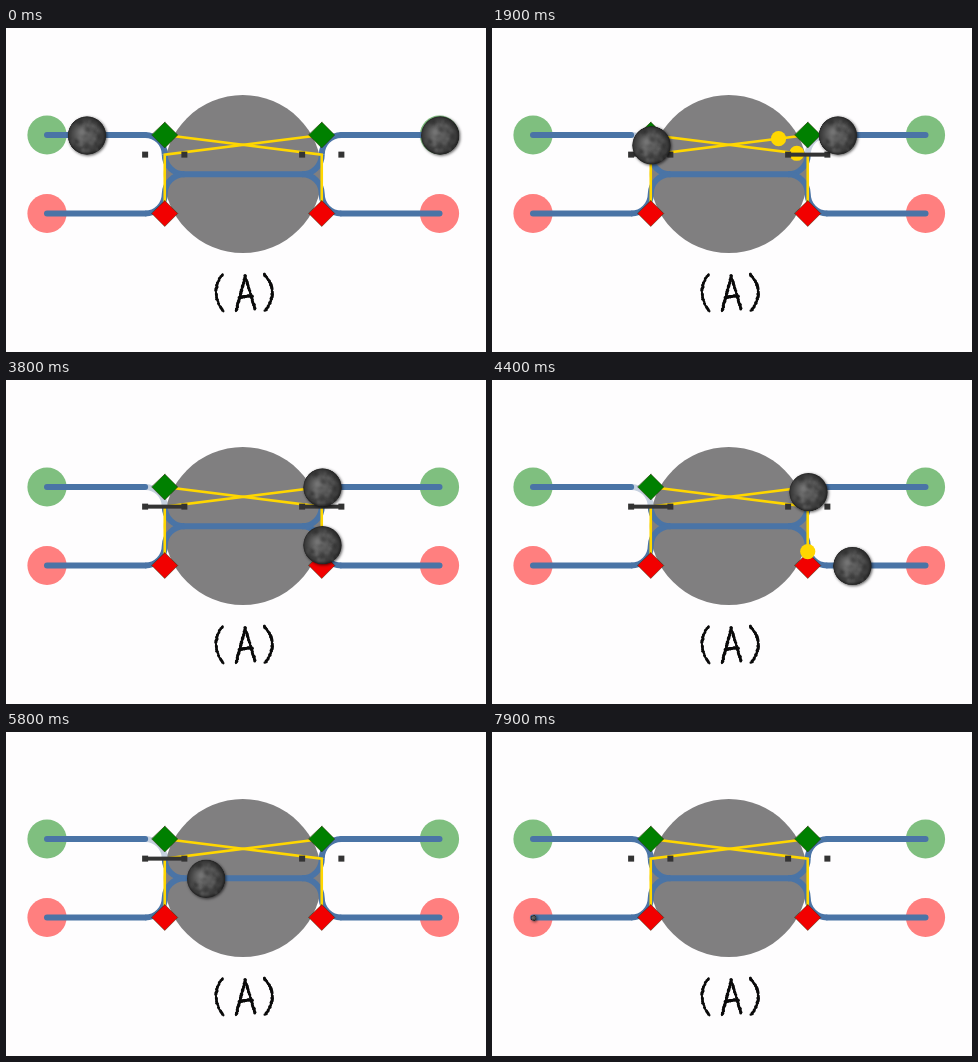
Animation of 480 by 324 pixels, one loop 8000 ms. Source, as an HTML page with a canvas:

```html
<!DOCTYPE html>
<html lang="en">
<head>
<meta charset="utf-8">
<title>Track junction</title>
<style>
  html, body { margin: 0; width: 100%; height: 100%; overflow: hidden; background: #fefdfe; }
  canvas { display: block; }
</style>
</head>
<body>
<canvas id="stage" width="480" height="324" role="img" aria-label="(A)"></canvas>
<script>
const ctx = document.getElementById('stage').getContext('2d');
const LOOP = 8000, STEP = 100;
const START = 1081, TICK = 364;      // balls cross one grid cell per tick
const CELL = 39.25, BALL_R = 19.6;
const BLUE = '#4a74a6', PALE = '#c5d0df', GOLD = '#ffd700', DARK = '#333333';

const X = g => 41 + g * CELL;
const Y = g => 107 + g * CELL;

const ROUTES = [
  { path: [[1, 0], [3, 0], [3, 1], [7, 1], [7, 2], [10, 2]], travel: k => k },
  { path: [[10, 0], [7, 0], [7, 1], [3, 1], [3, 2], [0, 2]], travel: k => k < 9 ? Math.min(k, 3) : k - 6 }
];
const GATES = [{ x: 3, shut: 2, open: 16 }, { x: 7, shut: 1, open: 9 }];
const SIGNALS = [
  { at: 1, from: [3, 0], to: [7, 0.5] },
  { at: 2, from: [7, 0], to: [3, 0.5] },
  { at: 9, from: [7, 2], to: [7, 0.5] },
  { at: 16, from: [3, 2], to: [3, 0.5] }
];

function random(seed) {
  return () => (seed = (seed * 16807) % 2147483647) / 2147483647;
}

function disc(x, y, r, fill, c = ctx) {
  c.fillStyle = fill;
  c.beginPath();
  c.arc(x, y, r, 0, Math.PI * 2);
  c.fill();
}

function line(points, color, width) {
  ctx.strokeStyle = color;
  ctx.lineWidth = width;
  ctx.beginPath();
  points.forEach(([x, y]) => ctx.lineTo(X(x), Y(y)));
  ctx.stroke();
}

function bend(a, corner, b, color) {
  ctx.strokeStyle = color;
  ctx.lineWidth = 6;
  ctx.beginPath();
  ctx.moveTo(X(a[0]), Y(a[1]));
  ctx.arcTo(X(corner[0]), Y(corner[1]), X(b[0]), Y(b[1]), CELL / 2);
  ctx.stroke();
}

function diamond(x, y, fill) {
  ctx.fillStyle = fill;
  ctx.strokeStyle = 'rgba(40,40,0,.6)';
  ctx.lineWidth = 0.8;
  ctx.beginPath();
  for (const [dx, dy] of [[0, -13], [13, 0], [0, 13], [-13, 0]]) ctx.lineTo(X(x) + dx, Y(y) + dy);
  ctx.closePath();
  ctx.fill();
  ctx.stroke();
}

// Mottled dark sphere, painted once at double size
const ball = document.createElement('canvas');
ball.width = ball.height = 80;
{
  const b = ball.getContext('2d'), rnd = random(41);
  b.beginPath();
  b.arc(40, 40, 39, 0, Math.PI * 2);
  b.clip();
  const base = b.createRadialGradient(30, 33, 3, 40, 40, 40);
  base.addColorStop(0, '#747474');
  base.addColorStop(0.5, '#515151');
  base.addColorStop(0.85, '#393939');
  base.addColorStop(1, '#1c1c1c');
  b.fillStyle = base;
  b.fillRect(0, 0, 80, 80);
  b.filter = 'blur(2px)';
  for (let i = 0; i < 70; i++) {
    const shade = rnd() < 0.5 ? '150,150,150' : '20,20,20';
    disc(8 + rnd() * 64, 8 + rnd() * 64, 1.5 + rnd() * 5, `rgba(${shade},${0.08 + rnd() * 0.16})`, b);
  }
}

function drawBall(x, y, scale) {
  const r = BALL_R * scale;
  ctx.save();
  ctx.shadowColor = 'rgba(0,0,0,.65)';
  ctx.shadowBlur = 3;
  ctx.shadowOffsetX = ctx.shadowOffsetY = 1;
  ctx.drawImage(ball, x + 0.7 - r, y + 0.5 - r, r * 2, r * 2);
  ctx.restore();
}

function along(path, distance) {
  for (let i = 1; i < path.length; i++) {
    const [ax, ay] = path[i - 1], [bx, by] = path[i];
    const length = Math.hypot(bx - ax, by - ay);
    if (distance <= length) {
      const p = distance / length;
      return { point: [ax + (bx - ax) * p, ay + (by - ay) * p], over: 0 };
    }
    distance -= length;
  }
  return { point: path[path.length - 1], over: distance };
}

// Rough brush lettering: quadratic strokes made of uneven dabs
function brush(x0, y0, cx, cy, x1, y1, rnd) {
  for (let i = 0; i <= 60; i++) {
    const t = i / 60, u = 1 - t;
    const x = u * u * x0 + 2 * u * t * cx + t * t * x1;
    const y = u * u * y0 + 2 * u * t * cy + t * t * y1;
    disc(x + (rnd() - 0.5) * 0.9, y + (rnd() - 0.5) * 0.7, 0.8 + rnd() * 0.75, '#0b0b0b');
  }
}

function drawLabel() {
  const rnd = random(97);
  brush(217, 246, 203, 264, 217, 283, rnd);
  brush(239, 248, 235, 266, 230, 283, rnd);
  brush(239, 248, 244, 264, 249, 281, rnd);
  brush(233, 270, 239, 268, 246, 268, rnd);
  brush(258, 246, 274, 263, 259, 283, rnd);
}

function draw(time) {
  const tick = Math.max(0, (time - START) / TICK);
  const shut = gate => tick >= gate.shut && tick < gate.open;

  ctx.fillStyle = '#fefdfe';
  ctx.fillRect(0, 0, 480, 324);
  disc(236.8, 146, 79, '#807f80');
  for (const x of [0, 10]) {
    disc(X(x), Y(0), 19.6, '#7fbf7f');
    disc(X(x), Y(2), 19.6, '#ff7f7f');
  }

  ctx.lineCap = 'butt';
  for (const gate of GATES) {
    const out = gate.x === 3 ? -1 : 1, g = gate.x;
    bend([g + out / 2, 0], [g, 0], [g, 0.5], shut(gate) ? PALE : BLUE);
    bend([g, 0.5], [g, 1], [g - out / 2, 1], BLUE);
    bend([g, 1.5], [g, 1], [g - out / 2, 1], BLUE);
    bend([g + out / 2, 2], [g, 2], [g, 1.5], BLUE);
  }
  ctx.lineCap = 'round';
  line([[3.5, 1], [6.5, 1]], BLUE, 6);
  for (const y of [0, 2]) {
    line([[0, y], [2.5, y]], BLUE, 6);
    line([[7.5, y], [10, y]], BLUE, 6);
  }

  line([[3, 0], [7, 0.5], [7, 2]], GOLD, 2.6);
  line([[7, 0], [3, 0.5], [3, 2]], GOLD, 2.6);
  for (const x of [3, 7]) {
    diamond(x, 0, '#008000');
    diamond(x, 2, '#f20000');
  }

  for (const { at, from, to } of SIGNALS) {
    const length = Math.hypot(to[0] - from[0], to[1] - from[1]);
    const gone = (tick - at) * 3;
    if (gone < 0 || gone > length + 0.2) continue;
    const { point: [x, y] } = along([from, to], Math.min(gone, length));
    disc(X(x), Y(y), 7.6, GOLD);
  }

  for (const gate of GATES) {
    const x = X(gate.x), y = Y(0.5);
    ctx.fillStyle = DARK;
    for (const side of [-1, 1]) ctx.fillRect(x + side * CELL / 2 - 3, y - 3, 6, 6);
    if (shut(gate)) ctx.fillRect(x - CELL / 2, y - 2, CELL, 4);
  }

  for (const { path, travel } of ROUTES) {
    const { point: [x, y], over } = along(path, travel(tick));
    const scale = 1 - over * TICK / 312;
    if (scale > 0) drawBall(X(x), Y(y), scale);
  }

  drawLabel();
}

const began = performance.now();
function frame() {
  const time = (performance.now() - began) % LOOP;
  draw(Math.floor(time / STEP) * STEP);
  requestAnimationFrame(frame);
}
frame();
</script>
</body>
</html>
```
